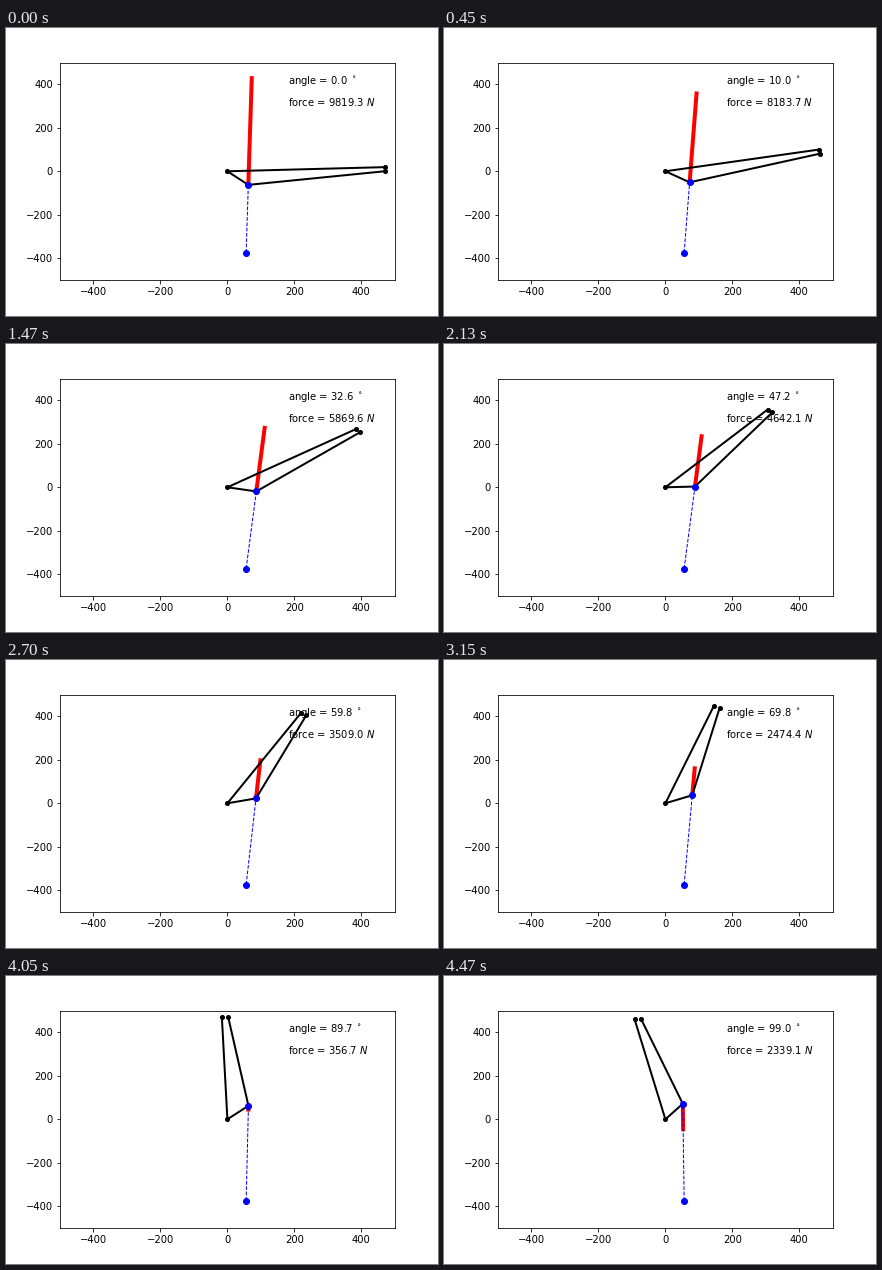
These frames come from a looping animation (432x288 px, 4.5 s). A matplotlib script:

```python
import numpy as np
import matplotlib.pyplot as plt
from matplotlib.animation import FuncAnimation

FRAMES = 150
INTERVAL = 30
ANGLES = np.linspace(0, 99, FRAMES)

# Geometry at zero angle, hinge at the origin
LID_TOP = np.array([469.25, 19.0])
LID_BOTTOM = np.array([469.25, 0.0])
MOUNT = np.array([62.5, -62.5])
ANCHOR = np.array([56.0, -374.0])
HINGE = np.zeros(2)

WEIGHT = 626376 / 469.25
FORCE_SCALE = 20  # newtons per unit of bar length


def rotate(point, degrees):
    a = np.radians(degrees)
    c, s = np.cos(a), np.sin(a)
    return np.array([c * point[0] - s * point[1], s * point[0] + c * point[1]])


def cylinder_force(load, mount):
    """Signed force along the cylinder that balances the load's moment."""
    axis = mount - ANCHOR
    length = np.hypot(*axis)
    arm = (ANCHOR[0] * mount[1] - ANCHOR[1] * mount[0]) / length
    return WEIGHT * load[0] / arm, axis / length


def set_points(line, *points):
    line.set_data(*np.transpose(points))


fig, ax = plt.subplots(figsize=(6, 4), dpi=72)
fig.subplots_adjust(left=0.125, right=0.9, bottom=0.125, top=0.88)
ax.set_xlim(-500, 500)
ax.set_ylim(-500, 500)

force_bar, = ax.plot([], [], "r-", lw=4)
lid, = ax.plot([], [], "ko-", lw=2, ms=4)
cylinder, = ax.plot([], [], "bo--", lw=1, ms=6)
angle_text = ax.text(180, 400, "")
force_text = ax.text(180, 300, "")


def update(i):
    angle = ANGLES[i]
    top, bottom, mount = (rotate(p, angle) for p in (LID_TOP, LID_BOTTOM, MOUNT))
    force, direction = cylinder_force(top, mount)

    set_points(force_bar, mount, mount + direction * force / FORCE_SCALE)
    set_points(lid, top, HINGE, mount, bottom)
    set_points(cylinder, ANCHOR, mount)
    angle_text.set_text(rf"angle = {angle:.1f} $^\circ$")
    force_text.set_text(f"force = {abs(force):.1f} $N$")
    return force_bar, lid, cylinder, angle_text, force_text


anim = FuncAnimation(fig, update, frames=FRAMES, interval=INTERVAL,
                     repeat=True, repeat_delay=0)
plt.show()
```
